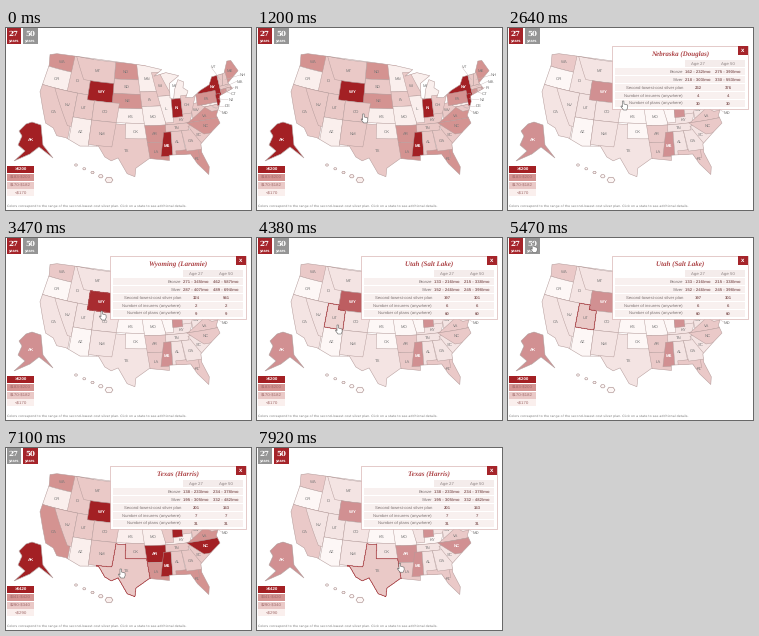
Recreate the animation shown at these times as a matplotlib script. Size 245x182 px, loop 8 s.

```python
import matplotlib.pyplot as plt
import numpy as np
from matplotlib.animation import FuncAnimation
from matplotlib.collections import PolyCollection
from matplotlib.patches import PathPatch, Polygon, Rectangle
from matplotlib.path import Path

W, H, STEP, LOOP = 245, 182, 50, 8000
RED, GREY, EDGE = "#a5242a", "#959595", "#b39a99"
SHADES = np.array([[250, 239, 237], [234, 201, 199], [212, 147, 145], [163, 32, 36]]) / 255
PT = 0.72

plt.rcParams["text.hinting"] = "none"
fig = plt.figure(figsize=(W / 100, H / 100), dpi=100, facecolor="white")
ax = fig.add_axes([0, 0, 1, 1])
ax.set_xlim(0, W)
ax.set_ylim(H, 0)
ax.axis("off")


def text(x, y, s, px, color="#777777", ha="center", font="Liberation Sans", z=3, **kw):
    return ax.text(x, y, s, fontsize=px * PT, color=color, ha=ha, va="center_baseline",
                   family=font, zorder=z, **kw)


def rect(x, y, w, h, color, z=2, **kw):
    return ax.add_patch(Rectangle((x, y), w, h, fc=color, zorder=z, **kw))


# --- map -------------------------------------------------------------
def albers(lon, lat):
    """Conic projection of west longitude and latitude to pixels."""
    s1, s2 = np.sin(np.radians([29.5, 45.5]))
    n = (s1 + s2) / 2
    c = 1 - s1 ** 2 + 2 * n * s1
    rho = lambda a: np.sqrt(c - 2 * n * np.sin(np.radians(a))) / n
    th = n * np.radians(96 - lon)
    return np.column_stack([135 + 275 * rho(lat) * np.sin(th),
                            90.5 - 275 * (rho(38) - rho(lat) * np.cos(th))])


def closed(pts):
    return Path(np.vstack([pts, pts[:1]]), closed=True)


names, shapes = [], []


def stack(group, lats, west, east):
    """States piled north to south; a pair for a side gives its top and bottom longitude."""
    side = lambda e, lat: np.interp(-lat, [-lats[0], -lats[-1]], np.broadcast_to(e, 2))
    for name, a, b in zip(group.split(), lats, lats[1:]):
        u = np.linspace(0, 1, 8)
        lat = a + (b - a) * u
        w, e = side(west, lat), side(east, lat)
        lon = np.concatenate([w[0] + (e[0] - w[0]) * u, e,
                              e[-1] + (w[-1] - e[-1]) * u, w[::-1]])
        names.append(name)
        shapes.append(albers(lon, np.concatenate([u * 0 + a, lat, u * 0 + b, lat[::-1]])))


# later stacks cover earlier ones, the coast trims them all
stack("WA OR CA", (49.5, 46, 42, 32), 125, 114.3)
stack("ID", (49.5, 42), 117, 111)
stack("NV", (42, 35), (120.6, 115), 114)
stack("UT AZ", (42, 37, 31), 114, 109)
stack("TX", (36.7, 25), 107, 93.8)
stack("ND SD NE KS", (49.5, 46, 43, 40, 37), 104, 94.5)
stack("OK", (37, 33.8), 100, 94)
stack("MT", (49.5, 45), (116.5, 113), 104)
stack("WY", (45, 41), 111, 104)
stack("CO NM", (41, 37, 31.9), 109, (102, 103.2))
stack("MN IA MO AR LA", (49.5, 43.5, 40.5, 36.5, 33, 28.5), (97.4, 93.6), 89)
stack("KY TN", (39, 36.5, 35), 89.6, (82, 83.8))
stack("WI IL", (47.5, 42.5, 36.9), (92.8, 89.5), 87.4)
stack("MI", (47.5, 41.7), (90.5, 86.8), 82)
stack("IN", (41.7, 37.9), 87.5, 84.8)
stack("WV", (40.3, 37.3), 82.3, 77.8)
stack("OH", (42.2, 38.4), 84.8, (80.5, 82.4))
stack("FL", (31, 24), 87.6, 79.5)
stack("MS", (35, 30), (90.2, 91.2), 88.3)
stack("AL", (35, 30), 88.3, (85.6, 85)), stack("FL", (31, 29), 87.5, 82)
stack("GA", (35, 30.7), (85.6, 84.9), 80.5)
stack("SC", (35.8, 31.8), (83.8, 80.9), 78)
stack("VA", (39.4, 36.5), (78, 83.7), 75)
stack("NC", (36.5, 33.7), (84, 80), 75)
stack("MD DE", (39.7, 39.2, 38), (79.5, 77), 75)
stack("NY", (45.1, 40.5), 79.9, 73.4)
stack("PA", (42.1, 39.7), 80.5, 74.9)
stack("NJ", (41.3, 38.9), 75.1, 73.8)
stack("ME", (47.6, 43), 71, 66.5)
stack("VT", (45.1, 42.7), 73.4, (71.5, 72.5))
stack("NH", (45.3, 42.7), (71.5, 72.5), 70.8)
stack("MA CT", (42.7, 42, 40.9), 73.4, 69.5)
stack("RI", (42, 41), 71.8, 70.5)

NORTH = [(124.7, 48.4), (122.7, 49), (95, 49), (89.6, 48), (92.1, 46.7), (88.4, 47.3),
         (84.6, 46.4), (87.6, 45), (87.8, 42), (86.8, 41.7), (86.3, 43.6), (85, 45.6),
         (83.4, 45), (83.8, 43.8), (82.5, 43), (83.4, 41.7), (81.5, 41.5), (79, 42.7),
         (76.2, 43.5), (75, 45), (71.2, 45.1), (69.4, 47.4), (68.2, 47.3), (67, 44.8)]
SOUTH = [(70.8, 43), (70, 41.6), (74, 40.8), (74.2, 39.6), (76, 37), (75.5, 35.3),
         (78, 33.9), (81.2, 31.8), (81.3, 30), (80.1, 26.8), (80.5, 25.2), (82.7, 27.8),
         (84, 30), (89.2, 30.2), (89.2, 29.1), (94, 29.7), (97.2, 27.7), (97.4, 25.9),
         (99.2, 26.5), (101.5, 29.7), (103.1, 29), (104.7, 29.7), (106.5, 31.8), (111, 31.3)]
WEST = [(114.8, 32.5), (117.1, 32.5), (118.4, 33.9), (120.6, 34.5), (122.4, 37.4),
        (124.3, 40.4), (124, 46.2)]
coast = [albers(*np.array(NORTH + SOUTH + WEST).T)]

names.append("AK")
shapes.append(np.array([(20, 96), (26, 94), (35, 97), (37, 117), (47, 130), (33, 119), (24, 126),
                        (8, 133), (19, 123), (12, 117), (16, 108), (13, 103)], float))
turn = np.linspace(0, 2 * np.pi, 7)[:-1]
for u in np.linspace(0, 1, 5):
    r = 1.6 + 2.4 * u ** 4
    names.append("HI")
    shapes.append(np.column_stack([70 + 33 * u + r * np.cos(turn),
                                   137 + 15 * u + .8 * r * np.sin(turn)]))
land = Path.make_compound_path(*map(closed, coast + shapes[names.index("AK"):]))

# topmost state at each half pixel, for label spots and hover outlines
gx, gy = np.meshgrid(np.arange(0, W, .5), np.arange(0, H, .5))
grid = np.column_stack([gx.ravel(), gy.ravel()])
owner = np.full(len(grid), "  ")
for name, pts in zip(names, shapes):
    owner[closed(pts).contains_points(grid)] = name
owner[~land.contains_points(grid)] = "  "

LEVELS = [
    {3: "AK WY IN MS NY NJ", 2: "WA ND NE AR LA PA ME CT VA NC FL",
     0: "OR AZ MN KS MO MI HI OK IL MD"},
    {3: "AK WY WI IN AR MS NC NJ", 2: "WA CA ND NE LA PA ME CT VA FL NY",
     0: "OR AZ MN KS MO MI HI KY MD"},
]


def level(age, name):
    return next((k for k, group in LEVELS[age].items() if name in group.split()), 1)


fills = [SHADES[[level(a, n) for n in names]] for a in (0, 1)]
states = ax.add_collection(PolyCollection(shapes, facecolors=fills[0], edgecolors=EDGE,
                                          linewidths=.45 * PT, zorder=1))
states.set_clip_path(land, ax.transData)
ax.add_patch(PathPatch(land, fc="none", ec=EDGE, lw=.5 * PT, zorder=1.5))

outside = {n: (237 - 3 * k, 47 + 6.2 * k) for k, n in enumerate("NH MA RI CT NJ DE MD".split())}
outside["VT"] = (208, 39)
labels = {}
for name in set(names) - {"HI"}:
    spot = grid[owner == name].mean(axis=0)
    x, y = outside.get(name, spot)
    if name in outside:
        ax.plot([spot[0], x - 3], [spot[1], y], color="#c4b5b5", lw=.4 * PT, zorder=2)
    labels[name] = text(x, y, name, 4.2)

hover = {n: ax.contour(gx, gy, (owner == n).reshape(gx.shape).astype(float), levels=[.5],
                       colors=RED, linewidths=.6 * PT, zorder=2.5)
         for n in ("NE", "WY", "UT", "TX")}

# --- buttons, legend, footer ----------------------------------------
buttons = []
for x, age in (.5, "27"), (17, "50"):
    buttons.append(rect(x, 0, 14.5, 15.5, GREY))
    text(x + 7.2, 5.4, age, 7.2, "white", font="DejaVu Serif", weight="bold")
    text(x + 7.2, 11.4, "years", 4, "white", weight="bold")

RANGES = [(">$200", "$183-$200", "$170-$182", "<$170"),
          (">$420", "$341-$420", "$290-$340", "<$290")]
legend = []
for k in range(4):
    y = 138 + 7.8 * k
    rect(1, y, 27, 7, SHADES[3 - k])
    legend.append(text(14.5, y + 3.6, "", 4.4, "white" if k == 0 else "#a06a6a",
                       weight="bold" if k == 0 else "normal"))
text(1, 177.5, "Colors correspond to the range of the second-lowest-cost silver plan. "
     "Click on a state to see additional details.", 3.3, "#777777", "left", "DejaVu Sans")

# --- tooltip ---------------------------------------------------------
TIPS = {
    "NE": "Nebraska (Douglas)|162 - 232/mo|275 - 390/mo|218 - 303/mo|330 - 553/mo"
          "|232|376|4|4|30|30",
    "WY": "Wyoming (Laramie)|271 - 345/mo|462 - 587/mo|287 - 407/mo|489 - 694/mo"
          "|324|551|2|2|9|9",
    "UT": "Utah (Salt Lake)|133 - 216/mo|215 - 338/mo|152 - 246/mo|245 - 398/mo"
          "|197|301|6|6|60|60",
    "TX": "Texas (Harris)|138 - 233/mo|234 - 378/mo|195 - 305/mo|332 - 482/mo"
          "|201|343|7|7|31|31",
}
ROWS = ("Bronze", "Silver", "Second-lowest-cost silver plan",
        "Number of insurers (anywhere)", "Number of plans (anywhere)")
tip = [rect(104, 17.5, 135.5, 63.5, "white", 5, ec="#d3a9a8", lw=.6 * PT),
       rect(230, 17.5, 9.5, 9.5, RED, 6),
       text(234.8, 22.3, "x", 6, "white", z=7, weight="bold")]
title = text(172, 26, "", 7, "#ad4447", font="Liberation Serif", z=7, weight="bold",
             style="italic")
cells = []
tip.append(rect(176.5, 31.5, 60, 7.5, "#f4eceb", 6))
for x, age in (190, "Age 27"), (220, "Age 50"):
    tip.append(text(x, 35.5, age, 4.4, "#8a8080", z=7))
for k, row in enumerate(ROWS):
    y = 43.6 + 7.9 * k
    tip.append(rect(107, y - 3.7, 129.5, 7.4, "#f8f0ef", 6))
    tip.append(text(175, y, row, 4.2, "#7d7373", "right", z=7))
    cells += [text(x, y, "", 4.2, "#8d6565", z=7, weight="bold") for x in (190, 220)]
tip += [title] + cells

HAND = np.array([(0, 0), (1.4, 0), (1.5, 3), (5, 4), (5.2, 6.5), (4.2, 9), (1, 9),
                 (-1.6, 5.6), (-1, 4.8), (0, 5.8)])
hand = ax.add_patch(Polygon(HAND, fc="white", ec="#666666", lw=.6 * PT, zorder=9))

# --- timeline --------------------------------------------------------
PATH = [(650, 4, 30), (1380, 124, 96), (1470, 124, 96), (2050, 119, 73), (2550, 119, 73),
        (2730, 95, 73), (3750, 95, 73), (4020, 80, 87), (4750, 80, 87), (5200, 24, 5),
        (6190, 25, 8), (6820, 114, 121), (7740, 114, 121), (7920, 143, 115)]
OPENED = [("NE", 2100, 180), ("WY", 3290, 180), ("UT", 4200, 270), ("TX", 7100, 180)]
CLOSED, SWITCH, REOPENED = 5560, 5740, 7100


def ramp(t, start, span):
    return float(np.clip((t - start) / span, 0, 1))


def cursor(t):
    for (t0, *a), (t1, *b) in zip(PATH, PATH[1:]):
        if t <= t1:
            u = ramp(t, t0, t1 - t0)
            return np.array(a) + (np.array(b) - a) * u * u * (3 - 2 * u)
    return np.array(PATH[-1][1:])


def draw(i):
    t = i * STEP
    mix = ramp(t, SWITCH, 150)
    age = int(t >= SWITCH)
    dim = ramp(t, 2100, 180) - ramp(t, CLOSED, 180) + ramp(t, REOPENED, 180)

    focus, shown = {}, None
    for name, start, span in OPENED:
        if t >= start:
            u = ramp(t, start, span) if name in ("WY", "UT") else 1
            focus = {n: f * (1 - u) for n, f in focus.items()}
            focus[name] = u
            shown = name
    if CLOSED <= t < REOPENED:
        shown = None

    base = fills[0] * (1 - mix) + fills[1] * mix
    fade = np.array([.5 * dim * (1 - focus.get(n, 0)) for n in names])[:, None]
    states.set_facecolor(base + (1 - base) * fade)
    for name, outline in hover.items():
        outline.set_visible(name == shown)
    for name, label in labels.items():
        dark = level(age, name) == 3 and name not in outside
        label.set_color("white" if dark else "#777777")
        label.set_weight("bold" if dark else "normal")

    for k in (0, 1):
        buttons[k].set_facecolor(RED if k == age else GREY)
    for label, s in zip(legend, RANGES[age]):
        label.set_text(s.replace("$", r"\$"))

    for part in tip:
        part.set_visible(shown is not None)
    if shown:
        for part, s in zip([title] + cells, TIPS[shown].split("|")):
            part.set_text(s)

    hand.set_visible(t >= PATH[0][0])
    hand.set_xy(HAND + cursor(t))
    return []


anim = FuncAnimation(fig, draw, frames=LOOP // STEP, interval=STEP, repeat=True,
                     repeat_delay=0, blit=False)
plt.show()
```
